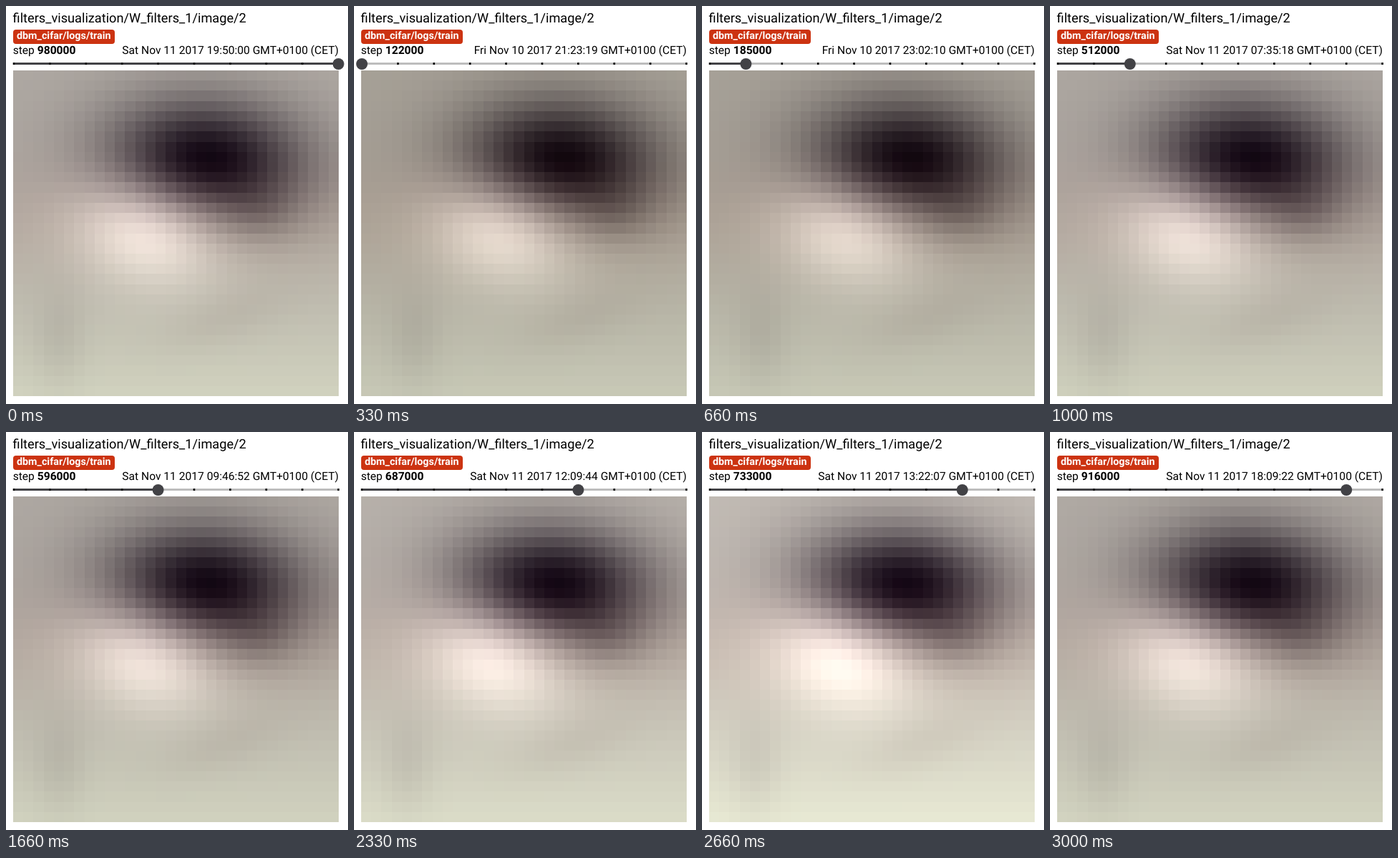
These frames come from a looping animation (478 by 556 pixels, 3330 ms). An HTML page with a canvas:

```html
<!DOCTYPE html>
<html lang="en">
<head>
<meta charset="utf-8">
<title>Filter steps</title>
<style>
  html, body { margin: 0; width: 100%; height: 100%; overflow: hidden; background: #fff; }
  svg { position: absolute; left: 0; top: 0; font-family: Roboto, Arial, sans-serif; text-rendering: geometricPrecision; }
  canvas { position: absolute; left: 10px; top: 90px; width: 455px; height: 455px; image-rendering: pixelated; }
  .title { font-size: 18.2px; }
  .run { font-size: 14.3px; font-weight: 700; fill: #fff; }
  .info { font-size: 15.6px; }
  .bold { font-weight: 700; }
</style>
</head>
<body>
<canvas id="filter" width="32" height="32"></canvas>
<svg width="478" height="556" viewBox="0 0 478 556">
  <text class="title" x="9.6" y="23.3">filters_visualization/W_filters_1/image/2</text>
  <rect x="10" y="33" width="142" height="20" rx="4" fill="#cc3311"/>
  <text class="run" x="15" y="46.3">dbm_cifar/logs/train</text>
  <text class="info" x="9.7" y="67.4">step <tspan class="bold" id="step"></tspan></text>
  <text class="info" id="date" x="465" y="67.4" text-anchor="end"></text>
  <rect x="10" y="79" width="455" height="3" fill="#bdbdbd"/>
  <rect id="bar" x="10" y="79" height="3" fill="#424246"/>
  <g id="ticks"></g>
  <circle id="knob" cy="81" r="8" fill="#424246"/>
</svg>
<script>
const LOOP = 3330, SIZE = 32;

// gain: brightness of the filter; early: how far it still is from its final look
const states = [
  { step: 980000, date: 'Sat Nov 11 2017 19:50:00', gain: 1 },
  { step: 122000, date: 'Fri Nov 10 2017 21:23:19', gain: 0.955, early: 1 },
  { step: 185000, date: 'Fri Nov 10 2017 23:02:10', gain: 0.955, early: 0.8 },
  { step: 512000, date: 'Sat Nov 11 2017 07:35:18', gain: 0.99 },
  { step: 593000, date: 'Sat Nov 11 2017 09:42:14', gain: 1.075 },
  { step: 596000, date: 'Sat Nov 11 2017 09:46:52', gain: 1 },
  { step: 638000, date: 'Sat Nov 11 2017 10:52:48', gain: 1 },
  { step: 687000, date: 'Sat Nov 11 2017 12:09:44', gain: 1.05 },
  { step: 733000, date: 'Sat Nov 11 2017 13:22:07', gain: 1.11 },
  { step: 916000, date: 'Sat Nov 11 2017 18:09:22', gain: 1.01 }
];

// backdrop colours and soft tilted ellipses of added colour, in cells
const top3 = [174, 168, 162], bottom3 = [208, 209, 190];
const blobs = [
  { x: 18.5, y: 8.2, rx: 9.6, ry: 5.8, tilt: 0.06, add: [-160, -163, -144] }, // dark centre
  { x: 12.6, y: 15, rx: 7, ry: 5, tilt: 0.25, add: [76, 74, 74] },            // highlight
  { x: 24, y: 13.5, rx: 3.5, ry: 2.5, tilt: 0, add: [-18, -18, -16] },        // lower right corner
  { x: 16, y: 14, rx: 25, ry: 6, tilt: 0, add: [2, -6, -8] },                 // warm band
  { x: 4, y: 26, rx: 2.5, ry: 5, tilt: 0, add: [-13, -14, -12] },             // left shadow
  { x: 20, y: 24, rx: 6, ry: 2.5, tilt: -0.3, add: [-8, -10, -9] }            // right shadow
];

const el = id => document.getElementById(id);
const ctx = el('filter').getContext('2d');
const startOf = i => Math.floor(i * 100 / 3) * 10;
const tickX = i => 11 + 50.4 * i;

function weight(b, x, y) {
  const dx = x - b.x, dy = y - b.y, c = Math.cos(b.tilt), s = Math.sin(b.tilt);
  return Math.exp(-(((dx * c + dy * s) / b.rx) ** 2) - ((dy * c - dx * s) / b.ry) ** 2);
}

function cellColour(x, y, gain, early) {
  const fall = Math.max(0, (y - 10) / 21) ** 1.3;
  const weights = blobs.map(b => weight(b, x - 0.7 * early, y));
  return top3.map((from, k) => {
    const base = from + (bottom3[k] - from) * fall;
    const sum = blobs.reduce((v, b, i) => v + b.add[k] * weights[i], base);
    const yellow = k === 2 ? 4 * early * (1 - fall) : 0;
    return Math.max(8, sum * gain - yellow);
  });
}

function paint(gain, early) {
  const img = ctx.createImageData(SIZE, SIZE);
  for (let y = 0; y < SIZE; y++) {
    for (let x = 0; x < SIZE; x++) {
      img.data.set([...cellColour(x, y, gain, early), 255], (y * SIZE + x) * 4);
    }
  }
  ctx.putImageData(img, 0, 0);
}

function show(i) {
  const { step, date, gain, early = 0 } = states[i];
  const x = tickX((i + 9) % 10);
  el('step').textContent = step;
  el('date').textContent = date + ' GMT+0100 (CET)';
  el('bar').setAttribute('width', x - 10);
  el('knob').setAttribute('cx', x);
  paint(gain, early);
}

for (let i = 0; i < 10; i++) {
  const tick = document.createElementNS('http://www.w3.org/2000/svg', 'rect');
  const attrs = { x: tickX(i) - 1.3, y: 79, width: 2.6, height: 3 };
  for (const key in attrs) tick.setAttribute(key, attrs[key]);
  el('ticks').append(tick);
}

const start = performance.now();
let shown = -1;
function frame() {
  const t = (performance.now() - start) % LOOP;
  const i = states.findLastIndex((_, k) => startOf(k) <= t);
  if (i !== shown) show(shown = i);
  requestAnimationFrame(frame);
}
frame();
</script>
</body>
</html>
```
